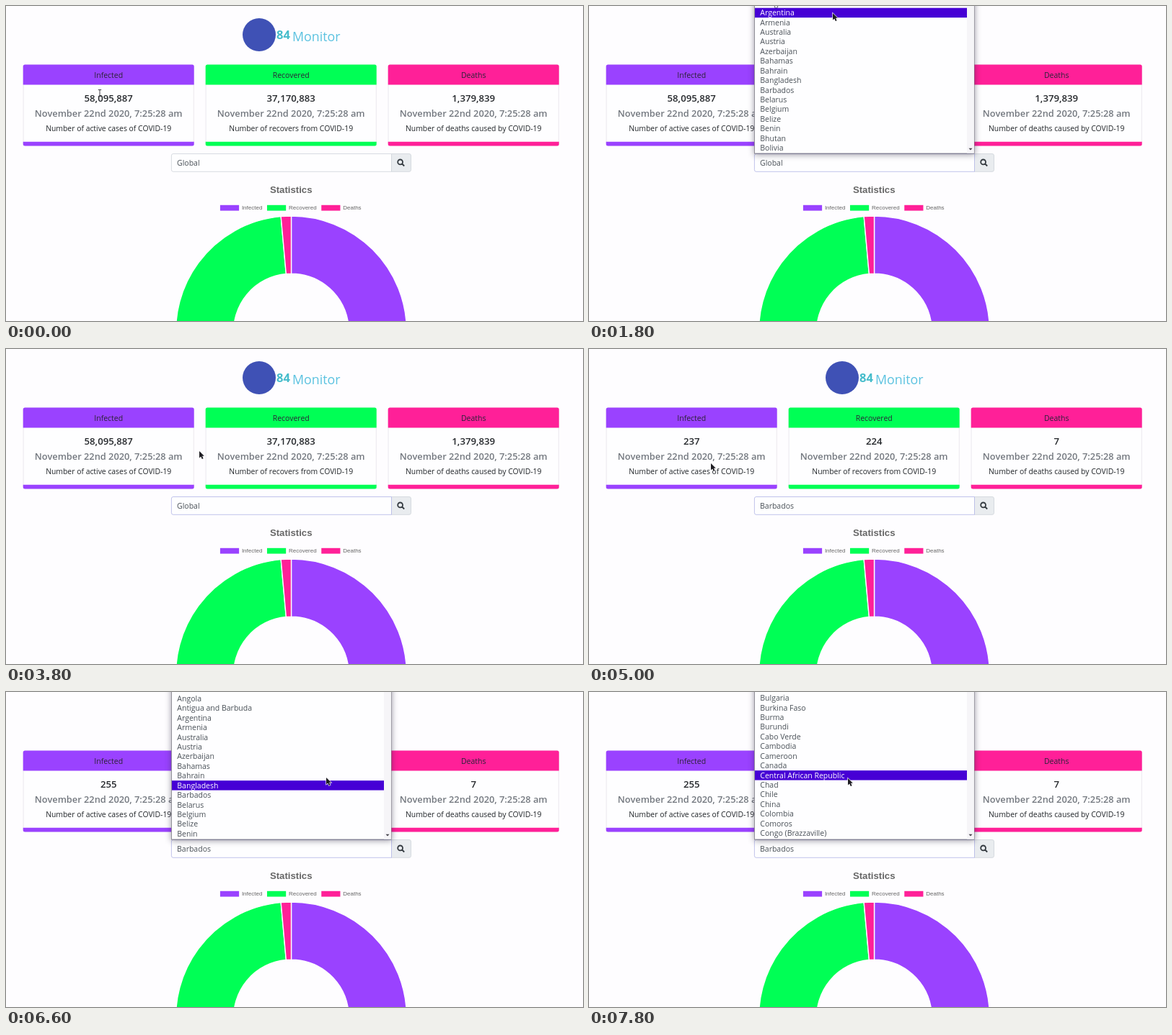
These frames come from a looping animation (800 by 438 pixels, 8 s). An HTML page with a canvas:

```html
<!DOCTYPE html>
<html lang="en">
<head>
<meta charset="utf-8">
<title>Case statistics</title>
<style>
  html, body { margin: 0; width: 100%; height: 100%; overflow: hidden; background: #fefdff; }
  canvas { display: block; width: 800px; height: 438px; }
</style>
</head>
<body>
<canvas id="stage"></canvas>
<script>
const canvas = document.getElementById('stage');
const ctx = canvas.getContext('2d');
const ratio = window.devicePixelRatio || 1;
canvas.width = 800 * ratio;
canvas.height = 438 * ratio;

const LOOP = 8000, STEP = 200, HOVER_LAG = 55;
const UI = '"Open Sans", "Noto Sans", sans-serif';
const CHART = '"Liberation Sans", Arial, sans-serif';
const ROW = 13.43, LIST_TOP = 9 - 5 * ROW;
const TAU = Math.PI * 2;

const countries = ('Global,Afghanistan,Albania,Algeria,Andorra,Angola,Antigua and Barbuda,' +
  'Argentina,Armenia,Australia,Austria,Azerbaijan,Bahamas,Bahrain,Bangladesh,Barbados,' +
  'Belarus,Belgium,Belize,Benin,Bhutan,Bolivia,Bosnia and Herzegovina,Botswana,Brazil,' +
  'Brunei,Bulgaria,Burkina Faso,Burma,Burundi,Cabo Verde,Cambodia,Cameroon,Canada,' +
  'Central African Republic,Chad,Chile,China,Colombia,Comoros,Congo (Brazzaville),' +
  'Congo (Kinshasa)').split(',');

const cards = [
  { name: 'Infected', color: '#9a42ff', world: 58095887, local: 255, note: 'Number of active cases of COVID-19' },
  { name: 'Recovered', color: '#00ff55', world: 37170883, local: 241, note: 'Number of recovers from COVID-19' },
  { name: 'Deaths', color: '#ff2098', world: 1379839, local: 7, note: 'Number of deaths caused by COVID-19' }
];

// Where the pointer comes to rest
const stops = [
  { t: 0, x: 130, y: 121 },
  { t: 1200, x: 345, y: 218 },
  { t: 1800, x: 338, y: 10 },
  { t: 2800, x: 273, y: 118 },
  { t: 3600, x: 268, y: 142 },
  { t: 3800, x: 268, y: 142 },
  { t: 5000, x: 169, y: 159 },
  { t: 6200, x: 425, y: 218 },
  { t: 6600, x: 444, y: 119 },
  { t: 7800, x: 359, y: 120 }
];

const ramp = (t, from, to) => Math.min(1, Math.max(0, (t - from) / (to - from)));
const ease = p => p * p * (3 - 2 * p);
const mix = (a, b, p) => a + (b - a) * p;

function pointer(t) {
  const next = stops.findIndex(s => s.t > t);
  if (next < 0) return stops[stops.length - 1];
  const a = stops[next - 1], b = stops[next];
  const p = ease(ramp(t, a.t, b.t));
  return { x: mix(a.x, b.x, p), y: mix(a.y, b.y, p) };
}

// Rows scrolled: a short way down and back, later a long way down
function scrolled(t) {
  return 1.97 * Math.sin(Math.PI * ramp(t, 1200, 2400)) + 21.045 * ramp(t, 6800, 7800);
}

function count(card, t) {
  if (t < 4000) return card.world;
  const p = ramp(t, 3950, 6700);
  return Math.round(card.local * (1 - 2 ** (-10 * p)) * 1024 / 1023);
}

function text(str, x, y, size, color, { weight = 400, align = 'left', family = UI } = {}) {
  ctx.font = `${weight} ${size}px ${family}`;
  ctx.textAlign = align;
  ctx.fillStyle = color;
  ctx.fillText(str, x, y + size * 0.36);
}

function rect(x, y, w, h, color) {
  ctx.fillStyle = color;
  ctx.fillRect(x, y, w, h);
}

function box(x, y, w, h, radii, fill, stroke) {
  ctx.beginPath();
  ctx.roundRect(x, y, w, h, radii);
  ctx.fillStyle = fill;
  ctx.fill();
  if (stroke) {
    ctx.strokeStyle = stroke;
    ctx.lineWidth = 0.8;
    ctx.stroke();
  }
}

function drawTitle() {
  ctx.beginPath();
  ctx.arc(351, 40, 23, 0, TAU);
  ctx.fillStyle = '#3f51b5';
  ctx.fill();
  text('84', 375, 40, 16.5, '#45bccb', { weight: 700 });
  text('Monitor', 397, 43, 17.8, '#5bc2e0');
}

function drawCard(card, i, t) {
  const x = 23.7 + 253 * i, w = 237, mid = x + w / 2;
  const center = { align: 'center' }, strong = { align: 'center', weight: 600 };
  box(x + 0.4, 82, w - 0.8, 112, 2.5, '#fefeff', '#e6e5ea');
  box(x, 81.6, w, 27.8, [2.5, 2.5, 0, 0], card.color);
  box(x, 188.8, w, 5.7, [0, 0, 2.5, 2.5], card.color);
  text(card.name, mid, 96, 10.5, '#2b2338', center);
  text(count(card, t).toLocaleString('en-US'), mid, 128, 13.2, '#24272b', strong);
  text('November 22nd 2020, 7:25:28 am', mid, 149, 12.8, '#73787f', strong);
  text(card.note, mid, 170.5, 10.4, '#212529', center);
}

function drawSelect(value, focused) {
  box(534.5, 205.5, 27, 24.8, [0, 2.5, 2.5, 0], '#e9ecef', '#ced4da');
  box(229.4, 205.5, 305.1, 24.8, [2.5, 0, 0, 2.5], '#fefeff', focused ? '#b2b5e6' : '#ced4da');
  text(value, 237, 218, 10.5, '#495057');
  ctx.strokeStyle = '#343a40';
  ctx.lineWidth = 1.8;
  ctx.beginPath();
  ctx.arc(546.6, 216.9, 3.4, 0, TAU);
  ctx.moveTo(549.2, 219.5);
  ctx.lineTo(552.2, 222.5);
  ctx.stroke();
}

function drawChart() {
  text('Statistics', 395.2, 255, 13.2, '#666', { weight: 700, align: 'center', family: CHART });
  const total = cards.reduce((sum, c) => sum + c.world, 0);
  let legendX = 296.9, from = -TAU / 4;
  ctx.strokeStyle = '#fff';
  ctx.lineWidth = 1.4;
  for (const { name, color, world } of cards) {
    rect(legendX, 276.8, 26.2, 7.8, color);
    text(name, legendX + 30, 280.3, 8, '#666', { family: CHART });
    legendX += 36.6 + ctx.measureText(name).width;

    const to = from + world / total * TAU;
    ctx.beginPath();
    ctx.arc(395.5, 452, 160, from, to);
    ctx.arc(395.5, 452, 79.8, to, from, true);
    ctx.closePath();
    ctx.fillStyle = color;
    ctx.fill();
    ctx.stroke();
    from = to;
  }
}

function drawList(t, selected) {
  const scroll = scrolled(t);
  const hoverY = pointer(t - HOVER_LAG).y;
  const active = hoverY > 205 ? selected : Math.round((hoverY - LIST_TOP) / ROW + scroll);

  ctx.save();
  ctx.shadowColor = 'rgba(40, 35, 60, 0.45)';
  ctx.shadowBlur = 8 * ratio;
  ctx.shadowOffsetY = ratio;
  rect(229, -20, 305.5, 225.5, '#77757f');
  ctx.restore();
  rect(229.8, -20, 304, 224.6, '#fefeff');
  rect(524, -20, 9.8, 224.6, '#f6f5f8');

  ctx.save();
  ctx.beginPath();
  ctx.rect(229.8, 0, 304, 204.6);
  ctx.clip();
  countries.forEach((name, i) => {
    const y = LIST_TOP + (i - scroll) * ROW;
    if (i === active) rect(230, y - ROW / 2, 294, ROW, '#4600d5');
    text(name, 237.3, y, 10.5, i === active ? '#fff' : '#495057');
  });
  ctx.restore();

  ctx.fillStyle = '#44424a';
  ctx.fill(new Path2D('M526.5 197.8H531.5L529 200.6Z'));
}

function drawPointer(t) {
  const { x, y } = pointer(t);
  ctx.save();
  ctx.translate(x, y);
  if (t < 400) {
    ctx.strokeStyle = '#44434a';
    ctx.lineWidth = 1;
    ctx.stroke(new Path2D('M-2.2-4.5H2.2M0-4.5V4.5M-2.2 4.5H2.2'));
  } else {
    const arrow = new Path2D('M0 0V9.4L2.2 7.4L3.8 11L5.6 10.2L4 6.8H6.8Z');
    ctx.strokeStyle = '#fff';
    ctx.lineWidth = 1.3;
    ctx.stroke(arrow);
    ctx.fillStyle = '#1d1c22';
    ctx.fill(arrow);
  }
  ctx.restore();
}

function draw(t) {
  ctx.setTransform(ratio, 0, 0, ratio, 0, 0);
  rect(0, 0, 800, 438, '#fefdff');
  const open = (t >= 1200 && t < 3800) || t >= 6400;
  const value = t < 4000 ? 'Global' : 'Barbados';
  drawTitle();
  cards.forEach((card, i) => drawCard(card, i, t));
  drawSelect(value, t >= 1200);
  drawChart();
  if (open) drawList(t, countries.indexOf(value));
  drawPointer(t);
}

function tick() {
  draw(Math.floor((performance.now() % LOOP) / STEP) * STEP);
  requestAnimationFrame(tick);
}
tick();
</script>
</body>
</html>
```
